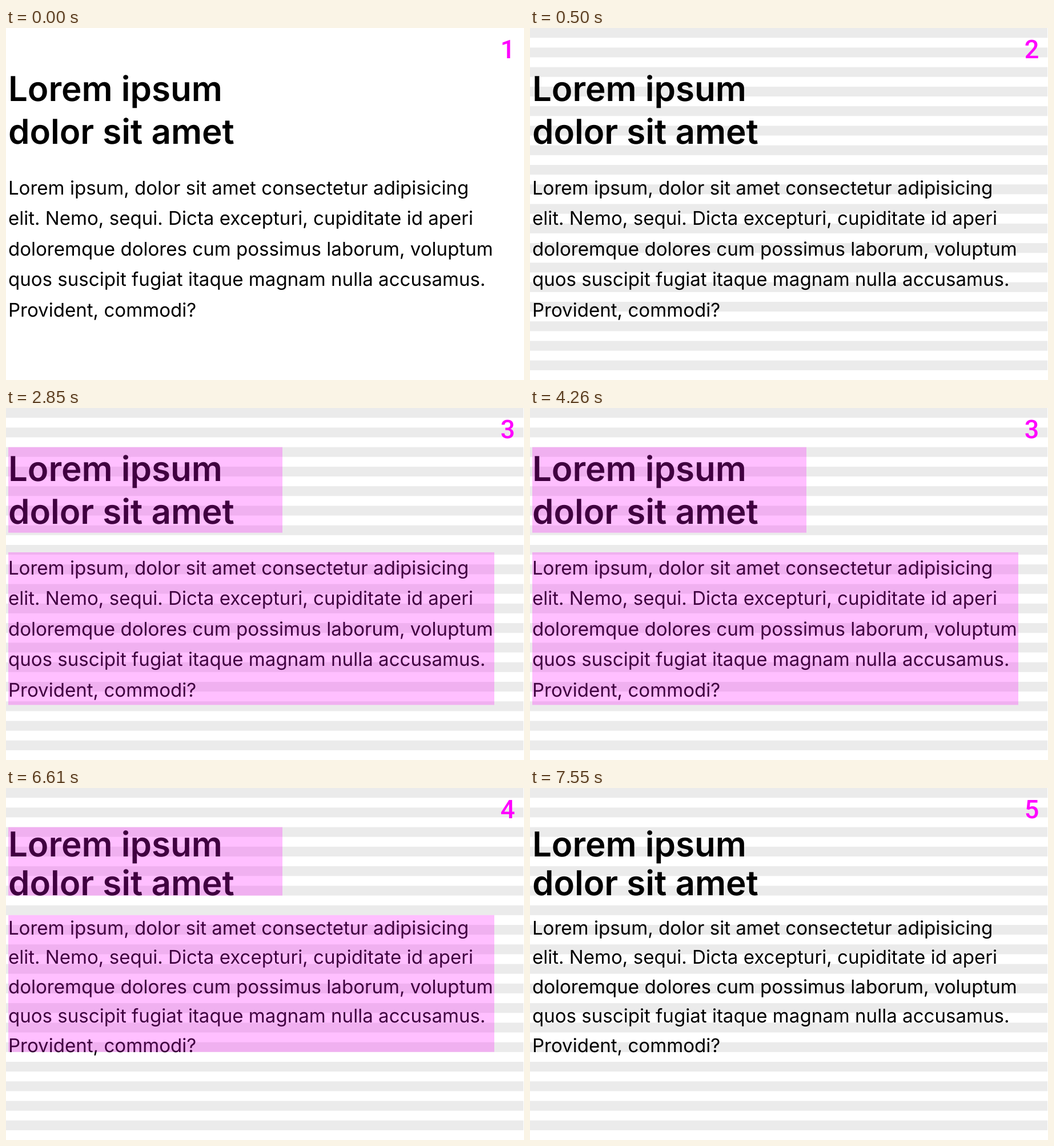
Write an HTML page that moves like this. It is 907 px wide and 617 px high and loops after 8 s.

```html
<!DOCTYPE html>
<html lang="la">
<head>
<meta charset="utf-8">
<title>Baseline grid steps</title>
<style>
  html, body { margin: 0; width: 100%; height: 100%; overflow: hidden; background: #fff; }
  svg { display: block; width: 907px; height: 617px; }
  text { white-space: pre; text-rendering: geometricPrecision; font-optical-sizing: none; }
  .head { font: 600 60.1px Inter, sans-serif; }
  .body { font: 400 33.1px Inter, sans-serif; }
  .step { font: 500 45px Roboto, sans-serif; font-stretch: 90%; fill: #f0f; text-anchor: middle; }
  .stripe { fill: #ebebeb; }
  .box { fill: #f0f; fill-opacity: .25; }
</style>
</head>
<body>
<svg id="stage" viewBox="0 0 907 617"></svg>
<script>
const LOOP = 8000;
const CUTS = [500, 2850, 5200, 7550];
const ROW = 17.14;
const HEAD = ["Lorem ipsum", "dolor sit amet"];
const BODY = [
  "Lorem ipsum, dolor sit amet consectetur adipisicing",
  "elit. Nemo, sequi. Dicta excepturi, cupiditate id aperi",
  "doloremque dolores cum possimus laborum, voluptum",
  "quos suscipit fugiat itaque magnam nulla accusamus.",
  "Provident, commodi?"
];
// First baseline, line step, box top and box height of each block.
const LOOSE = {
  head: { base: 127.7, step: 75, top: 68.6, height: 150 },
  body: { base: 291.7, step: 53.56, top: 252.9, height: 267.6 }
};
const SNAPPED = {
  head: { base: 119.8, step: 4 * ROW, top: 68.6, height: 120 },
  body: { base: 256.9, step: 3 * ROW, top: 222.8, height: 239.9 }
};

const stage = document.getElementById("stage");

function add(tag, attrs, parent = stage) {
  const el = document.createElementNS("http://www.w3.org/2000/svg", tag);
  set(el, attrs);
  parent.appendChild(el);
  return el;
}

function set(el, attrs) {
  for (const key in attrs) el.setAttribute(key, attrs[key]);
}

function addLines(lines, cls) {
  return lines.map(line => {
    const el = add("text", { class: cls, x: 3.9 });
    el.textContent = line;
    return el;
  });
}

const grid = add("g", {});
for (let i = 0; i < 18; i++) {
  add("rect", { class: "stripe", x: 0, y: i * 2 * ROW, width: 906, height: ROW }, grid);
}
const lines = { head: addLines(HEAD, "head"), body: addLines(BODY, "body") };
const boxes = {
  head: add("rect", { class: "box", x: 4, width: 480 }),
  body: add("rect", { class: "box", x: 4, width: 851 })
};
const label = add("text", { class: "step", x: 878.5, y: 53 });

function show(el, on) {
  el.style.display = on ? "" : "none";
}

let shown = -1;

function render(time) {
  const step = CUTS.filter(cut => time % LOOP >= cut).length;
  if (step === shown) return;
  shown = step;
  const layout = step < 3 ? LOOSE : SNAPPED;
  show(grid, step > 0);
  for (const part in layout) {
    const { base, step: gap, top, height } = layout[part];
    lines[part].forEach((el, i) => set(el, { y: base + i * gap }));
    set(boxes[part], { y: top, height });
    show(boxes[part], step === 2 || step === 3);
  }
  label.textContent = step + 1;
}

const start = performance.now();

function tick() {
  render(performance.now() - start);
  requestAnimationFrame(tick);
}
tick();
</script>
</body>
</html>
```
